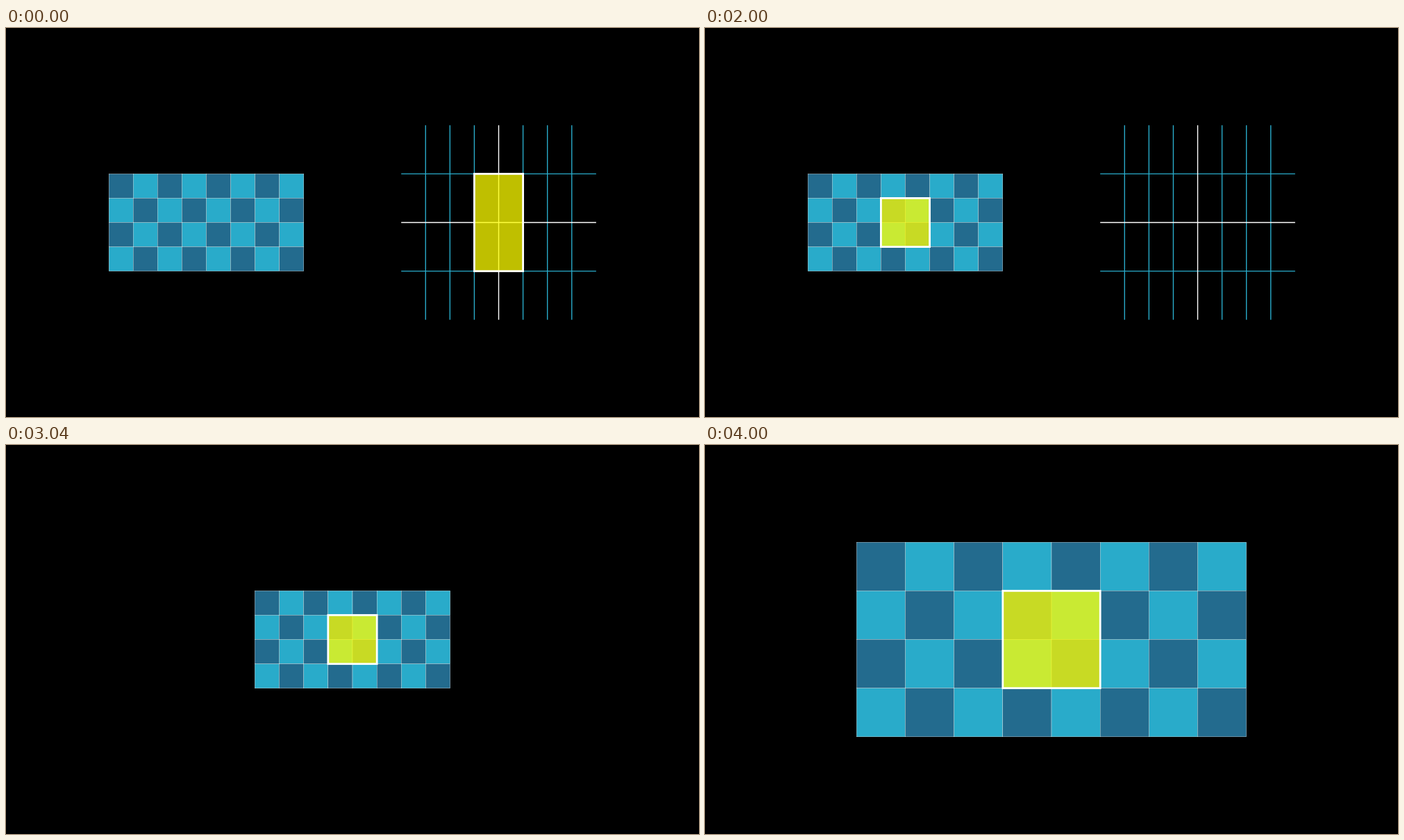
Write an HTML page with a canvas that moves like this. It is 998x561 px and loops after 5 s.

```html
<!DOCTYPE html>
<html lang="en">
<head>
<meta charset="utf-8">
<title>Checkerboard and plane</title>
<style>
  html, body { margin: 0; height: 100%; overflow: hidden; background: #000; }
  canvas { display: block; }
</style>
</head>
<body>
<canvas id="stage" width="998" height="561"></canvas>
<script>
const ctx = document.getElementById('stage').getContext('2d');
const WIDTH = 998, HEIGHT = 561, LOOP = 5000;
const UNIT = WIDTH * 9 / 128;
const DARK = '#236b8e', LIGHT = '#29abca', WHITE = '#fff';

const px = x => WIDTH / 2 + x * UNIT;
const py = y => HEIGHT / 2 + y * UNIT;
const mix = (a, b, k) => a + (b - a) * k;
const sigmoid = x => 1 / (1 + Math.exp(-x));

// Sigmoid easing, rescaled to run exactly from 0 to 1.
function ease(t) {
  const edge = sigmoid(-5);
  const k = (sigmoid(10 * (t - 0.5)) - edge) / (1 - 2 * edge);
  return Math.min(1, Math.max(0, k));
}

function line(x1, y1, x2, y2, color) {
  ctx.strokeStyle = color;
  ctx.lineWidth = 1.4;
  ctx.beginPath();
  ctx.moveTo(px(x1), py(y1));
  ctx.lineTo(px(x2), py(y2));
  ctx.stroke();
}

function box(cx, cy, w, h, fill, lineWidth) {
  const rect = [px(cx - w / 2), py(cy - h / 2), w * UNIT, h * UNIT];
  ctx.fillStyle = fill;
  ctx.fillRect(...rect);
  ctx.strokeStyle = WHITE;
  ctx.lineWidth = lineWidth;
  ctx.strokeRect(...rect);
}

function plane(cx, opacity) {
  ctx.globalAlpha = opacity;
  for (const y of [-1, 1]) line(cx - 2, y, cx + 2, y, LIGHT);
  for (let i = -3; i <= 3; i++) {
    if (i) line(cx + i / 2, -2, cx + i / 2, 2, LIGHT);
  }
  line(cx - 2, 0, cx + 2, 0, WHITE);
  line(cx, -2, cx, 2, WHITE);
  ctx.globalAlpha = 1;
}

function checkerboard(cx, cell) {
  for (let row = 0; row < 4; row++) {
    for (let col = 0; col < 8; col++) {
      const color = (row + col) % 2 ? LIGHT : DARK;
      box(cx + (col - 3.5) * cell, (row - 1.5) * cell, cell, cell, color, 0.35);
    }
  }
}

function draw(ms) {
  // 60 steps per second, shown every 20 ms.
  const time = Math.round(Math.floor((ms % LOOP) / 20 + 0.05) * 1.2) / 60;
  const carry = ease(time), center = ease(time - 2), zoom = 1 + ease(time - 3);
  const boardX = mix(-3, 0, center);

  ctx.fillStyle = '#000';
  ctx.fillRect(0, 0, WIDTH, HEIGHT);
  if (center < 1) plane(3, 1 - center);
  checkerboard(boardX, zoom / 2);
  box(mix(3, boardX, carry), 0, zoom, mix(2, 1, carry) * zoom, 'rgba(255,255,0,0.75)', 2.8);
}

function tick(now) {
  draw(now);
  requestAnimationFrame(tick);
}
draw(0);
requestAnimationFrame(tick);
</script>
</body>
</html>
```
